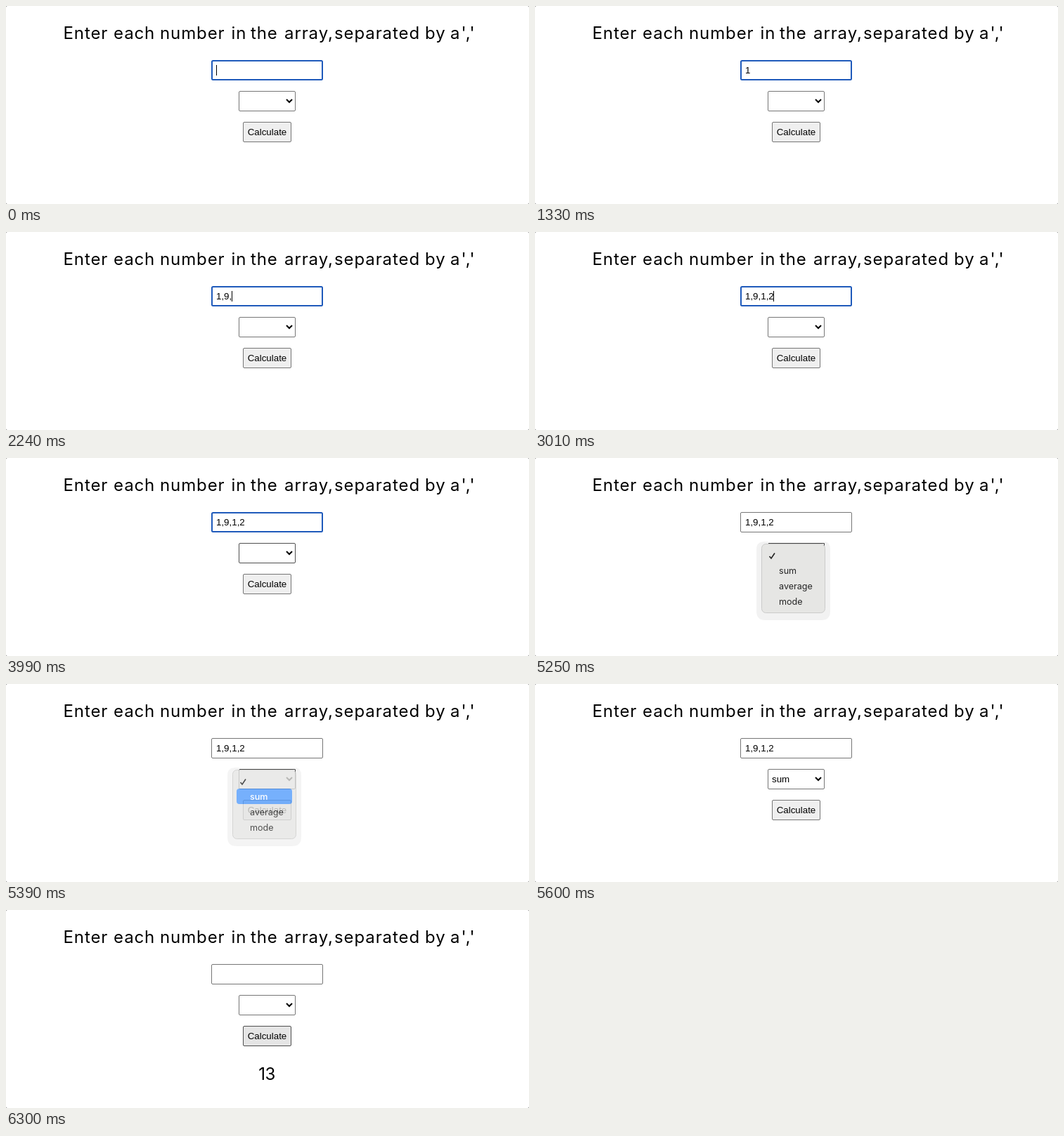
These frames come from a looping animation (744x282 px, 6.72 s). An HTML page:

```html
<!DOCTYPE html>
<html lang="en">
<head>
<meta charset="utf-8">
<title>Array calculator</title>
<style>
  html, body { margin: 0; width: 100%; height: 100%; overflow: hidden; background: #fff; }
  svg { display: block; width: 744px; height: 282px; }
  text { font: 13.333px "Liberation Sans", Arial, sans-serif; }
  .big { font: 24px Inter, sans-serif; }
  #heading { letter-spacing: .9px; }
  #result { letter-spacing: -.5px; }
  .item { font: 12.6px Inter, sans-serif; fill: #262626; }
  .item.on { font-weight: 500; fill: #fff; }
  .box { fill: #fff; stroke: #767676; rx: 1.5px; }
  .box.hover { stroke: #4f4f4f; }
  .box.focus { stroke: #1f5abb; stroke-width: 2; }
  #button { fill: #efefef; }
  #button.hover { fill: #e5e5e5; }
  .line { fill: none; stroke-width: 2; }
</style>
</head>
<body>
<svg viewBox="0 0 744 282">
  <rect width="744" height="282" fill="#777"/>
  <rect width="744" height="282" rx="2" fill="#fff"/>
  <text class="big" id="heading" y="47"></text>

  <rect class="box" id="input" x="292.5" y="77.5" width="158" height="28"/>
  <text id="value" x="299" y="96"></text>
  <rect id="caret" y="84" width="1" height="15"/>

  <rect class="box" id="select" x="331.5" y="121.5" width="80" height="28"/>
  <text id="choice" x="337" y="140">sum</text>
  <path class="line" d="M399 133l4 4 4-4" stroke="#000"/>

  <rect class="box" id="button" x="337.5" y="165.5" width="68" height="28"/>
  <text x="343.7" y="184">Calculate</text>
  <text class="big" id="result" x="371" y="241.5" text-anchor="middle">13</text>

  <g id="menu">
    <path d="M331 150H315V130q0-11 12-11h4.5v2.5H412V119q8 1 8 11v88q0 13-13 13h-79q-13 0-13-13V150z" fill="#f2f2f2"/>
    <path d="M332 121.500h79.500v6" fill="none" stroke="#444"/>
    <rect x="322.5" y="122.5" width="90" height="98" rx="6" fill="#e6e6e4" stroke="#cbcbca"/>
    <rect id="highlight" x="328" width="79" height="22" rx="4" fill="#559dfc"/>
    <path class="line" id="check" d="M333.5 140l2.5 3 5-7.5" style="stroke-width:1.6"/>
    <text class="item" id="sum" x="347" y="165">sum</text>
    <text class="item" x="347" y="187">average</text>
    <text class="item" x="347" y="209">mode</text>
  </g>
</svg>
<script>
const LOOP = 6720;
const get = id => document.getElementById(id);
const show = (id, on) => get(id).style.display = on ? '' : 'none';
const toggle = (id, name, on) => get(id).classList.toggle(name, on);

const words = "Enter each number in the array, separated by a ','".split(' ');
const starts = [81.5, 153, 219, 320.5, 348, 396, 467, 596, 632, 647.5];
get('heading').innerHTML = words.map((w, i) => `<tspan x="${starts[i]}">${w}</tspan>`).join(' ');

const typed = '1,9,1,2';
const keyTimes = [840, 1610, 2030, 2240, 2520, 2730, 3010];
const caretOff = [[490, 840], [1330, 1610], [3500, 4130], [4620, LOOP]];
const within = (t, a, b) => t >= a && t < b;

function menuOpacity(t) {
  if (!within(t, 4620, 5600)) return 0;
  return t < 5390 ? 1 : t < 5460 ? .8 : t < 5530 ? .5 : .22;
}

function draw(t) {
  const count = keyTimes.filter(k => t >= k).length;
  const done = t >= 6090;
  get('value').textContent = done ? '' : typed.slice(0, count);

  const width = [...typed.slice(0, count)].reduce((x, c) => x + (c === ',' ? 3.7 : 7.41), 0);
  get('caret').setAttribute('x', Math.floor(299 + width));
  show('caret', !caretOff.some(([a, b]) => within(t, a, b)));

  toggle('input', 'focus', t < 4620);
  // The focus ring is inset so that its outer edge meets the border's.
  const inset = t < 4620 ? .5 : 0;
  get('input').setAttribute('transform', `translate(${inset} ${inset})`);
  get('input').setAttribute('width', 158 - 2 * inset);
  get('input').setAttribute('height', 28 - 2 * inset);

  toggle('select', 'hover', within(t, 3990, 5600));
  show('choice', within(t, 5460, 6090));
  toggle('button', 'hover', t >= 6020);
  show('result', done);

  const onSum = t >= 4900;
  const blink = within(t, 5250, 5320);
  get('menu').setAttribute('opacity', menuOpacity(t));
  get('highlight').setAttribute('y', onSum ? 149 : 127);
  show('highlight', !blink);
  toggle('sum', 'on', onSum && !blink);
  get('check').setAttribute('stroke', onSum ? '#222' : '#fff');
}

const begin = performance.now();
(function tick() {
  draw((performance.now() - begin) % LOOP);
  requestAnimationFrame(tick);
})();
</script>
</body>
</html>
```
